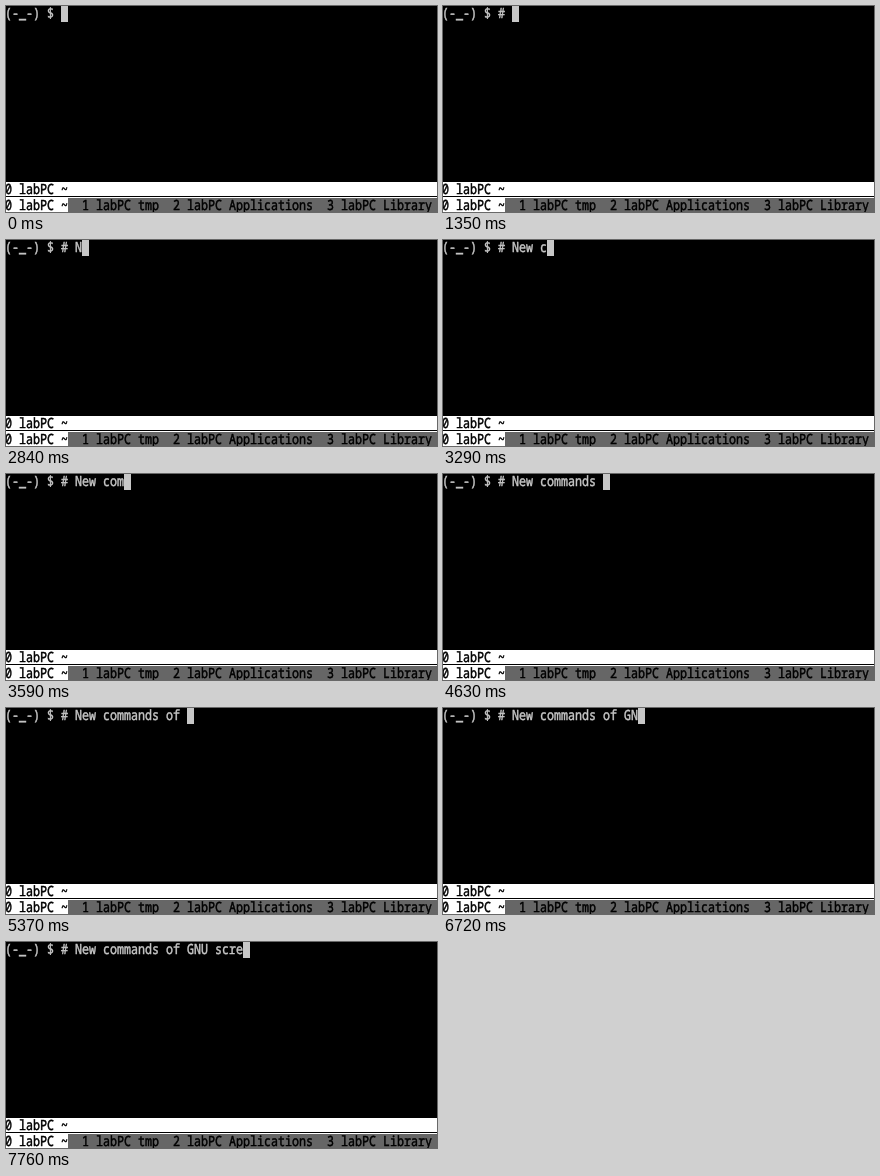
Recreate the animation shown at these times as an HTML page. Size 431x206 px, loop 8000 ms.

```html
<!DOCTYPE html>
<html lang="en">
<head>
<meta charset="utf-8">
<title>Terminal typing</title>
<style>
  html, body { margin: 0; width: 100%; height: 100%; overflow: hidden; background: #000; }
  svg { display: block; width: 431px; height: 206px; }
  text {
    font: 500 14px "Noto Sans Mono", "DejaVu Sans Mono", "Liberation Mono", monospace;
    font-variant-ligatures: none;
    text-rendering: geometricPrecision;
    white-space: pre;
    stroke: #000;
    stroke-width: .5px;
  }
  .shell { fill: #c7c7c7; }
  text.shell { stroke: #c7c7c7; }
  /* The cursor drags a black cover that hides what is not typed yet. */
  .cursor { animation: type 8s step-end infinite; }
  @keyframes type {
    0%      { transform: translateX(55px); }
    15%     { transform: translateX(62px); }
    16.875% { transform: translateX(69px); }
    35.5%   { transform: translateX(76px); }
    37.375% { transform: translateX(90px); }
    39.25%  { transform: translateX(97px); }
    41.125% { transform: translateX(104px); }
    43%     { transform: translateX(111px); }
    44.875% { transform: translateX(118px); }
    46.75%  { transform: translateX(125px); }
    48.625% { transform: translateX(132px); }
    50.5%   { transform: translateX(139px); }
    56%     { transform: translateX(153px); }
    57.875% { transform: translateX(160px); }
    65.25%  { transform: translateX(167px); }
    67.125% { transform: translateX(181px); }
    84%     { transform: translateX(195px); }
    87.75%  { transform: translateX(202px); }
    89.625% { transform: translateX(209px); }
    93.375% { transform: translateX(223px); }
    97%, 100% { transform: translateX(237px); }
  }
</style>
</head>
<body>
<svg viewBox="0 0 431 206" shape-rendering="crispEdges">
  <rect width="431" height="206"/>
  <!-- condensed 7px character grid -->
  <g transform="translate(-1 0) scale(.8333 1)">
    <text class="shell" y="12">(-_-) $ # New commands of GNU scre</text>
  </g>
  <g class="cursor">
    <rect width="431" height="16"/>
    <rect class="shell" width="7" height="16"/>
  </g>

  <rect y="176" width="431" height="16" fill="#fff"/>
  <rect y="190" width="431" height="1"/>
  <rect y="192" width="62" height="14" fill="#fff"/>
  <rect x="62" y="192" width="369" height="14" fill="#666"/>
  <g transform="translate(-1 0) scale(.8333 1)">
    <text y="188">0 labPC ~</text>
    <text y="204">0 labPC ~  1 labPC tmp  2 labPC Applications  3 labPC Library</text>
  </g>
</svg>
</body>
</html>
```
